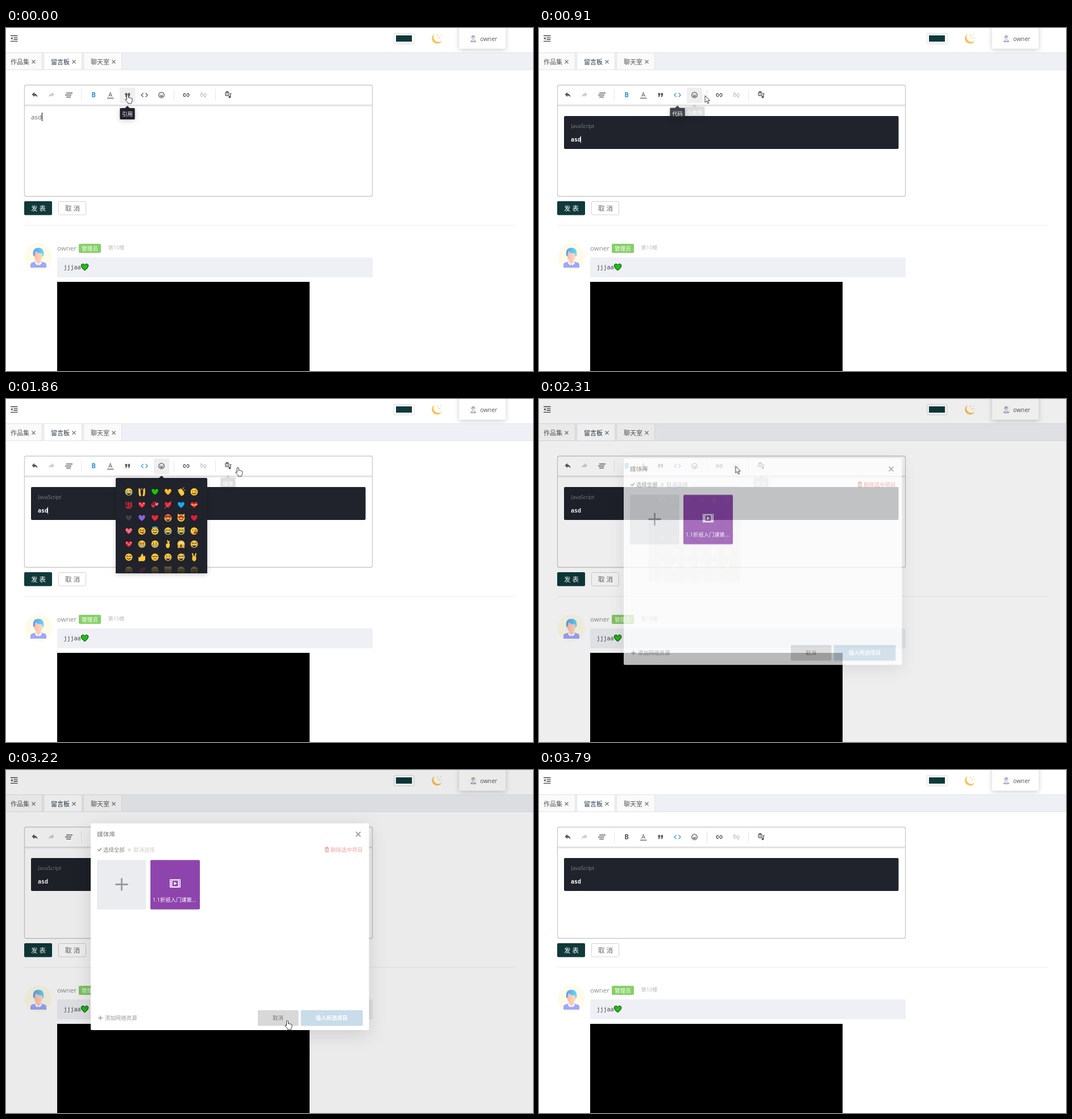
An HTML page that plays this animation: 927 px wide and 604 px high, repeating every 4.04 s.

```html
<!DOCTYPE html>
<html lang="zh-CN">
<head>
<meta charset="utf-8">
<title>留言板</title>
<style>
html, body { margin: 0; width: 100%; height: 100%; overflow: hidden; background: #fff; }
svg { display: block; width: 100%; height: 100%; }
text { font: 9.4px "Open Sans", "Noto Sans CJK SC", "Noto Sans CJK", sans-serif; }
.mono { font-family: "DejaVu Sans Mono", monospace; font-size: 10px; }
.mid { text-anchor: middle; }
.line { fill: none; stroke: currentColor; stroke-width: 1.3; }
.round { stroke-linecap: round; stroke-linejoin: round; }
.shade { filter: drop-shadow(0 2px 4px rgba(0,0,0,.2)); }
.icons { color: #54585d; }
.off { color: #ccc; }

.a { animation: 4040ms linear infinite; }
.step { animation-timing-function: step-end; }
.ease { animation-timing-function: ease; }

.tip-quote { animation-name: tip-quote; }
.tip-code { animation-name: tip-code; }
.tip-emoji { animation-name: tip-emoji; }
.tip-media { animation-name: tip-media; }
@keyframes tip-quote {
  0%, 10.64% { opacity: 1; transform: none; }
  13.86%, 100% { opacity: 0; transform: translateY(-3px); }
}
@keyframes tip-code {
  0%, 11.88%, 25.5%, 100% { opacity: 0; transform: translateY(-3px); }
  14.85%, 22.03% { opacity: 1; transform: none; }
}
@keyframes tip-emoji {
  0%, 21.78%, 39.6%, 100% { opacity: 0; transform: translateY(-3px); }
  26.73%, 36.63% { opacity: 1; transform: none; }
}
@keyframes tip-media {
  0%, 45.54%, 57.92%, 100% { opacity: 0; transform: translateY(-3px); }
  49%, 53.96% { opacity: 1; transform: none; }
}

.hover { animation-name: hover; }
@keyframes hover {
  0% { transform: translateX(200px); }
  11.14% { transform: translateX(230px); }
  21.29% { transform: translateX(260px); }
  54.2%, 100% { transform: translateX(-60px); }
}
.plain { animation-name: plain; }
@keyframes plain { 0% { opacity: 1; } 4.46%, 100% { opacity: 0; } }
.quote { animation-name: quote; }
@keyframes quote { 0% { opacity: 0; } 4.46% { opacity: 1; } 16.34%, 100% { opacity: 0; } }
.code { animation-name: code; }
@keyframes code { 0% { opacity: 0; } 16.34%, 100% { opacity: 1; } }
.caret { animation-name: caret; }
@keyframes caret { 0% { opacity: 1; } 48.27%, 100% { opacity: 0; } }
.b-icon { animation-name: b-icon; }
@keyframes b-icon { 0% { color: #3498db; } 86.6%, 100% { color: #54585d; } }
.q-icon { animation-name: q-icon; }
@keyframes q-icon { 0% { color: #54585d; } 4.46% { color: #3498db; } 16.34%, 100% { color: #54585d; } }
.c-icon { animation-name: c-icon; }
@keyframes c-icon { 0% { color: #54585d; } 16.34%, 100% { color: #3498db; } }

.picker { animation-name: picker; }
@keyframes picker {
  0%, 34.65%, 58.66%, 100% { opacity: 0; transform: translateY(15px); }
  39.6%, 53.71% { opacity: 1; transform: none; }
}
.mask { animation-name: mask; }
@keyframes mask { 0%, 53.96%, 89.6%, 100% { opacity: 0; } 57.67%, 82.18% { opacity: 1; } }
.modal { animation-name: modal; }
@keyframes modal {
  0%, 53.96%, 89.6%, 100% { opacity: 0; transform: translateY(38px); }
  61.39%, 82.18% { opacity: 1; transform: none; }
}

.pointer { animation-name: pointer; }
@keyframes pointer {
  0% { transform: translate(214px,117px); }
  7.43% { transform: translate(214px,118px); }
  11.39% { transform: translate(246px,118px); }
  16.83% { transform: translate(247px,118px); }
  19.8% { transform: translate(262px,118px); }
  22.52% { transform: translate(292px,119px); }
  25.99% { transform: translate(296px,119px); }
  29.21%, 34.16% { transform: translate(275px,118px); }
  36.63% { transform: translate(304px,124px); }
  40.1% { transform: translate(388px,122px); }
  43.07% { transform: translate(406px,121px); }
  46.04% { transform: translate(408px,120px); }
  49.5% { transform: translate(394px,118px); }
  53.47% { transform: translate(392px,118px); }
  57.18% { transform: translate(346px,118px); }
  61.39% { transform: translate(302px,170px); }
  66.34% { transform: translate(340px,260px); }
  74.26% { transform: translate(486px,430px); }
  79.7%, 100% { transform: translate(495px,441px); }
}
.hand { animation-name: hand; }
@keyframes hand {
  0%, 27.97%, 40.6%, 73.27% { opacity: 1; }
  21.04%, 35.15%, 55.2%, 84.65%, 100% { opacity: 0; }
}
.arrow { animation-name: arrow; }
@keyframes arrow {
  0%, 27.97%, 40.6%, 73.27%, 91.6%, 100% { opacity: 0; }
  21.04%, 35.15%, 55.2%, 84.65% { opacity: 1; }
}
</style>
</head>
<body>
<svg viewBox="0 0 927 604" preserveAspectRatio="none">
<defs>
  <linearGradient id="hair" x2="1"><stop stop-color="#5b9df5"/><stop offset="1" stop-color="#62dcf5"/></linearGradient>
  <linearGradient id="skin" x2="1"><stop stop-color="#ffb9a8"/><stop offset="1" stop-color="#ffdcc4"/></linearGradient>
  <linearGradient id="fade" x2="0" y2="1"><stop stop-color="#20232b" stop-opacity="0"/><stop offset="1" stop-color="#20232b" stop-opacity=".9"/></linearGradient>
  <clipPath id="list"><path d="M193 139h161v168h-161z"/></clipPath>
  <path id="heart" d="M0 5.8C-9-.5-6.4-5.6-3.4-5.6-1.6-5.6-.5-4.5 0-3.4.5-4.5 1.6-5.6 3.4-5.6 6.4-5.6 9-.5 0 5.8Z"/>
  <path id="x" class="line" d="M-3-3 3 3M3-3-3 3" stroke-width="1"/>
  <g id="avatar">
    <circle r="24" fill="#fffbe8"/>
    <path d="M-14 19v-5q0-4 5-4.500l5-1.500h8l5 1.500q5 .5 5 4.500v5z" fill="#9da8fc"/>
    <path d="M-4 4h8v5l-4 5-4-5z" fill="#ffcab5"/>
    <path d="m-5 8 5 5 5-5 1 3-4 4-2-2-2 2-4-4z" fill="#fff"/>
    <path d="M-7-9H7v10q-2 7-7 7T-7 1z" fill="url(#skin)"/>
    <path d="M-9-2q-2-14 9-14 11 0 9 14l-2 1v-5q-8 0-12-4l-2 9z" fill="url(#hair)"/>
  </g>
</defs>

<!-- header and tabs -->
<path d="M8 13.500h12.500M13.500 16.800h7M13.500 20h7M8 23.300h12.500" class="line" color="#444"/>
<path d="m11.500 15.800v5l-3.300-2.500z" fill="#444"/>
<rect x="682.500" y="9.500" width="35.500" height="18.500" rx="1.500" fill="#fff" stroke="#dcdcdc"/>
<path d="M686 13h28v11h-28z" fill="#0c3a3b"/>
<path d="M754 10.500a9 9 0 1 0 12.500 11.500 8.500 8.500 0 0 1-12.500-11.500z" fill="#fdc04c"/>
<g fill="#fbd98d"><circle cx="759" cy="13" r="1.200"/><circle cx="764.500" cy="12" r="1"/><circle cx="762" cy="17" r="1.300"/><circle cx="766" cy="17.500" r=".8"/></g>
<rect x="797" y="-6" width="82" height="42.500" rx="2" fill="#fff" class="shade"/>
<use href="#avatar" transform="translate(822 18.500) scale(.34)"/>
<text x="834" y="22.500" fill="#555" style="font-size:10.200px">owner</text>
<path d="M0 43h927v30.500H0z" fill="#eff0f5"/>
<path d="M0 73.500h927M0 43.500h927" stroke="#e3e4e8"/>
<g id="tabs"></g>

<!-- editor -->
<rect x="32.500" y="100.500" width="612" height="196" rx="3" fill="#fff" stroke="#c9c9c9" stroke-width="1.300"/>
<path d="M33 136h611" stroke="#ccc" stroke-width="1.300"/>
<path d="M33 137.500h611" stroke="#f0f0f0" stroke-width="2"/>
<rect class="a step hover" y="105" width="27.500" height="27.500" rx="1.500" fill="#efeff0"/>
<path d="M132.500 108v20M295.500 108v20M368.500 108v20" stroke="#e6e6e6"/>
<g class="icons">
  <path id="undo" d="M45.500 117l4.500-4v2.500q5 .5 5.500 6.500-2-3-5.500-3v2.500z" fill="currentColor"/>
  <use href="#undo" class="off" transform="matrix(-1 0 0 1 130.500 0)"/>
  <path class="line" d="M106 114.500h11M104 118h11M106 121.500h8" stroke-width="1.500"/>
  <text class="a step b-icon mid" x="154" y="122" fill="currentColor" style="font-size:11.500px;font-weight:700">B</text>
  <text class="mid" x="183.500" y="121" fill="currentColor" style="font-size:11px">A</text>
  <path class="line" d="M178 123.500h11.500" stroke-width="1"/>
  <path class="a step q-icon" d="M209.500 114.500h3.600v3.500l-1.500 3.500h-1.800l1-3h-1.300zM214.500 114.500h3.600v3.500l-1.500 3.500h-1.800l1-3h-1.300z" fill="currentColor"/>
  <path class="a step c-icon line" d="m241.500 114.500-3.500 3.500 3.500 3.500M245.500 114.500l3.500 3.500-3.500 3.500" stroke-width="1.500"/>
  <circle cx="273.500" cy="118" r="4.800" class="line"/>
  <path class="line round" d="M271.700 116.600v.1M275.300 116.600v.1"/>
  <path d="M270.500 118.800h6q-.8 2.500-3 2.500t-3-2.500z" fill="currentColor"/>
  <path id="link" class="line" d="M316 115.500h-1.500a2.500 2.500 0 0 0 0 5h1.500M318 115.500h1.500a2.500 2.500 0 0 1 0 5h-1.500M315 118h4"/>
  <g class="off"><use href="#link" x="30"/><path class="line" d="m342.500 113 9 10"/></g>
  <rect class="line" x="386" y="113.500" width="6" height="5.500" rx="1" stroke-width="1.500"/>
  <path class="line" d="M387.500 113v-1h3v1M394.800 121v-5.500h1.700" stroke-width="1.500"/>
  <circle cx="389" cy="116.200" r="1" fill="currentColor"/><circle cx="393.500" cy="121.500" r="2" fill="currentColor"/>
</g>

<g class="a step plain">
  <text x="44" y="160.500" fill="#666" style="font-size:11.500px">asd</text>
  <path class="line" color="#333" d="M63.500 149v15" stroke-width="1"/>
</g>
<g class="a step quote">
  <path d="M44 155h589v32H44z" fill="#f1f2f3"/><path d="M44 155h3.500v32H44z" fill="#ccc"/>
  <text x="62" y="175" fill="#666" style="font-size:11.500px;font-style:italic">asd</text>
  <path class="line" color="#333" d="M81.500 164v15" stroke-width="1"/>
</g>
<g class="a step code">
  <rect x="44" y="155" width="588.500" height="58" rx="2" fill="#20232b"/>
  <text x="56.500" y="175.500" fill="#7f8289" style="font-size:9px">JavaScript</text>
  <text class="mono" x="56" y="199.500" fill="#fff" font-weight="700" style="font-weight:700">asd</text>
  <path class="a step caret" d="M73.500 190v12.500" stroke="#ddd"/>
</g>

<rect x="32" y="305" width="49" height="24.500" rx="2" fill="#10393a"/>
<text x="44" y="322" fill="#fff" style="font-size:11.500px">发 表</text>
<rect x="92.500" y="305.500" width="48" height="23.500" rx="2" fill="#fff" stroke="#d2d2d2"/>
<text x="104" y="322" fill="#666" style="font-size:11.500px">取 消</text>
<path d="M32 347.500h864" stroke="#eee"/>

<!-- comment -->
<use href="#avatar" x="57" y="403"/>
<text x="90" y="391.500" fill="#8a8a8a" style="font-size:11.500px">owner</text>
<rect x="128" y="380" width="39" height="16" rx="2" fill="#87d068"/>
<text x="133" y="391.500" fill="#fff" style="font-size:9.600px">管理员</text>
<text x="179.500" y="390" fill="#bcbcbc" style="font-size:9.200px">第10楼</text>
<rect x="90" y="404" width="555" height="35" rx="2" fill="#eff0f5"/>
<text class="mono" x="101.500" y="425" fill="#444">jjjaa</text>
<use href="#heart" x="138.500" y="421" fill="#16c60c" stroke="#111"/>
<path d="M90 447h444v157H90z"/>

<g id="tips"></g>

<g class="a ease picker">
  <rect x="193" y="139" width="161" height="168" rx="2" fill="#20232b" class="shade"/>
  <path d="m269 139 4.500-4 4.500 4z" fill="#20232b"/>
  <g id="emojis" clip-path="url(#list)"></g>
  <path d="M193 286h161v21h-161z" fill="url(#fade)"/>
</g>

<path class="a mask" d="M0 0h927v604H0z" fill-opacity=".08"/>

<g class="a ease modal">
  <rect x="149" y="94" width="489.500" height="364" rx="2" fill="#fff" style="filter:drop-shadow(0 8px 16px rgba(0,0,0,.12))"/>
  <text x="160" y="117" fill="#777" style="font-size:10.700px">媒体库</text>
  <use href="#x" transform="translate(619.500 113) scale(1.350)" color="#999"/>
  <path class="line" d="m161.500 140 2.300 2.500 4-5" color="#888"/>
  <text x="171" y="144" fill="#858585">选择全部</text>
  <use href="#x" transform="translate(217 140.500) scale(.8)" color="#ccc"/>
  <text x="224" y="144" fill="#ccc">取消选择</text>
  <path class="line" d="M561 138h7M563 137.500v-1.500h3v1.500M562 138v6h5v-6M564.500 139.500v3" color="#eea39b" stroke-width="1"/>
  <text x="571" y="144" fill="#eea39b">删除选中项目</text>
  <rect x="160" y="158.500" width="86.500" height="87" rx="2" fill="#ebecef"/>
  <path class="line" d="M192.500 201.500h22M203.500 190.500v22" color="#999" style="stroke-width:2.800"/>
  <rect x="254" y="158.500" width="87" height="87" rx="2" fill="#8e44ad"/>
  <path d="M288 192.500h19v14.500h-19z" fill="#fff"/>
  <path d="M292.500 194.500h10v10.500h-10z" fill="#8e44ad"/>
  <path d="m295.500 196.500 5 3.200-5 3.300z" fill="#fff"/>
  <path d="M290.200 194v12M304.800 194v12" stroke="#8e44ad" stroke-width="1.800" stroke-dasharray="2 1.600"/>
  <text x="258" y="231.500" fill="#fff" style="font-size:9.300px">1.1折纸入门课第...</text>
  <path class="line" d="M162 436.500h8M166 432.500v8" color="#999"/>
  <text x="174" y="440" fill="#999">添加网络资源</text>
  <rect x="443" y="423" width="71.500" height="27.500" rx="2" fill="#d8d8d8"/>
  <text class="mid" x="478.500" y="440" fill="#777" style="font-weight:500">取消</text>
  <rect x="518.500" y="423" width="109" height="27.500" rx="2" fill="#c8dcea"/>
  <text class="mid" x="573" y="440" fill="#fff" style="font-weight:700">插入所选项目</text>
</g>

<g class="a pointer">
  <path class="a step arrow" d="M0 0v12l2.800-2.500 2 4.500 2-.8-2-4.400h3.700z" fill="#fff" stroke="#222" stroke-width=".9"/>
  <path class="a step hand round" d="M-1.500 9V1.300q1.500-1.800 3 0V6q1.500-1 2.500.3 1.500-.6 2.200.5 1.600-.4 1.800 1v3.500q-.5 2-1.500 3.200V16H.5v-1.500L-4 10q-.5-2 1-2z" fill="#fff" stroke="#222" stroke-width=".9"/>
</g>
</svg>
<script>
const put = (id, items) => document.getElementById(id).innerHTML = items.join('');

put('tabs', [['作品集', 0, 64, 8], ['留言板', 67, 67, 79], ['聊天室', 137, 67, 149]].map(([name, x, w, tx], i) => `
  <rect x="${x - .5}" y="43.500" width="${w}" height="30" fill="${i === 1 ? '#fff' : '#fafafa'}" stroke="#e1e2e6"/>
  <text x="${tx}" y="63.500" fill="${i === 1 ? '#234' : '#555'}" style="font-size:11px">${name}</text>
  <use href="#x" x="${tx + 40.500}" y="59.500" color="#777"/>`));

put('tips', [['quote', 213.500, '引用'], ['code', 243.500, '代码'], ['emoji', 273.500, '小表情'], ['media', 390.500, '媒体']].map(([name, x, label]) => {
  const w = label.length * 9.400 + 7.500;
  return `<g transform="translate(${x})"><g class="a tip-${name}"><g class="shade" fill="#20232b">
    <rect x="${-w / 2}" y="141" width="${w}" height="20" rx="1.500"/><path d="m-4 141 4-4 4 4z"/></g>
    <text class="mid" y="155" fill="#fff">${label}</text></g></g>`;
}));

const ink = '#3b2a1a', skin = '#ffc83d';
const stroke = (d, color = ink, w = 1.2) => `<path class="round" d="${d}" fill="none" stroke="${color}" stroke-width="${w}"/>`;
const shape = (d, color) => `<path d="${d}" fill="${color}"/>`;
const heart = (color, s = 1, x = 0, y = 0) =>
  `<use href="#heart" transform="translate(${x} ${y}) scale(${s})" fill="${color}" stroke="#111" stroke-width=".7"/>`;
const eyes = {
  dot: stroke('M-2.400-2v.6M2.400-2v.6', ink, 1.6),
  arc: stroke('M-4-1q1.500-2.500 3 0M1-1q1.500-2.500 3 0'),
  shut: stroke('M-4-1.500q1.500 1.500 3 0M1-1.500q1.500 1.500 3 0'),
  wink: stroke('M-2.400-2v.6M1-1.500h3'),
  love: heart('#e8283a', .5, -3, -2) + heart('#e8283a', .5, 3, -2),
  wide: '<circle cx="-2.500" cy="-2" r="1.700" fill="#fff"/><circle cx="2.500" cy="-2" r="1.700" fill="#fff"/>' + stroke('M-2.500-2v.1M2.500-2v.1')
};
const mouths = {
  smile: stroke('M-3 2q3 3 6 0'),
  open: shape('M-4 1h8q-1 4.500-4 4.500t-4-4.500z', ink) + shape('M-3.500 1h7l-.5 1.300h-6z', '#fff'),
  teeth: shape('M-4 1h8q0 3.500-4 3.500t-4-3.500z', '#fff') + stroke('M-4 1h8q0 3.500-4 3.500t-4-3.500zM-3 2.700h6', ink, .6),
  flat: stroke('M-2 3h4'),
  gasp: '<ellipse cy="3" rx="1.600" ry="2.200" fill="#3b2a1a"/>',
  tongue: stroke('M-3 1.500q3 3 6 0') + shape('M0 3h3.500v2q-2 1.500-3.500-2z', '#e8485a'),
  kiss: stroke('M0 1.500q2 .5 0 1.500 2 .5 0 1.500') + heart('#e8283a', .4, 4, 3)
};
const extras = {
  tears: stroke('M-5 0v3M5 0v3', '#4cc2f1', 2),
  sweat: stroke('M4.500-5v2', '#4cc2f1', 2),
  halo: '<ellipse cy="-6" rx="4.500" ry="1.300" fill="none" stroke="#4cc2f1" stroke-width="1.200"/>',
  ears: shape('M-6-2v-5.500l5 3zM6-2v-5.500l-5 3z', skin),
  palms: shape('M-6 7V2l3-1v6zM6 7V2l-3-1v6z', '#e9a52e')
};
const draw = {
  f: (e, m, ...more) => `<circle r="6.700" fill="${skin}" stroke="#111" stroke-width=".5"/>` +
    eyes[e] + mouths[m] + more.map(k => extras[k]).join(''),
  h: color => heart(color),
  shine: color => heart(color) + stroke('M-3.500-2.500v1M3-3l1 1M0 0l1 1', '#ffd0dc', 1.5),
  bow: () => heart('#e8283a') + stroke('M-5-1q5 3 10 0', '#f7c33c', 1.800),
  dart: () => heart('#e8283a') + stroke('m-6 6L6-6', '#d98b9c', 1),
  pair: () => heart('#e8283a', .6, -3, 2) + heart('#ff6f8d', .55, 3, -1) + stroke('M-6-1q4-5 9-4', '#e8283a'),
  hundred: () => stroke('m-5.500-4 1-1v6M-1.500-4h2v5h-2zM3-4h2v5h-2zM-5 4 6 3M-3 6l6-.5', '#e8283a', 1.300),
  raise: () => stroke('M-4-4V1q0 3 1 5M4-4V1q0 3-1 5', skin, 3.400) + stroke('M-5-6v1M5-6v1M0-6v2', skin),
  clap: () => `<g transform="rotate(-35)">${shape('M-4 6V-2l2-5 2 2 2-1 2 3v7l-3 3z', skin)}</g>` + stroke('M3-6l2-1M5-3h2', skin),
  thumb: () => shape('M-6 0h3l3-6q3 0 2 4h4v6l-2 3h-10z', skin),
  cross: () => stroke('M-1-6 1 0M2-5 0 1', skin, 2) + shape('M-3-1h6v5l-2 3h-3l-2-4z', skin),
  peace: () => stroke('M-3-6-1 0M3-6 1 0', skin, 2.200) + shape('M-3.500-1h7v5l-2 3h-3l-2-3z', skin),
  lips: () => shape('M-6 2q3-6 6-5l3-2q2 1 4 0-3 9-8 9-2 0-5-2z', '#d8304a') + stroke('M-3 2q4-1 7-4', '#7a1428', 1)
};
const rows = [
  'f:wink,open,tears raise h:#16c60c h:#ffb62b clap f:wink,smile',
  'hundred shine:#e8283a pair dart h:#1ba8e8 bow',
  'h:#3b3e45 h:#8764d8 h:#e8283a f:love,open f:love,smile,ears h:#d4203c',
  'shine:#f0506e f:arc,tongue f:arc,smile,halo f:arc,open,tears f:arc,open,ears,tears f:wink,kiss',
  'shine:#e8283a f:arc,teeth f:dot,teeth cross f:wide,gasp,palms f:arc,open',
  'f:arc,smile thumb f:shut,flat f:dot,open f:arc,open,sweat peace',
  'f:arc,open lips f:dot,flat f:shut,flat,ears f:shut,smile f:shut,gasp,palms'
];
put('emojis', rows.flatMap((row, j) => row.split(' ').map((token, i) => {
  const [kind, args = ''] = token.split(':');
  return `<g transform="translate(${216 + 23 * i} ${163.500 + 23 * j})" opacity="${j === 6 ? .6 : 1}">${draw[kind](...args.split(','))}</g>`;
})));
</script>
</body>
</html>
```
